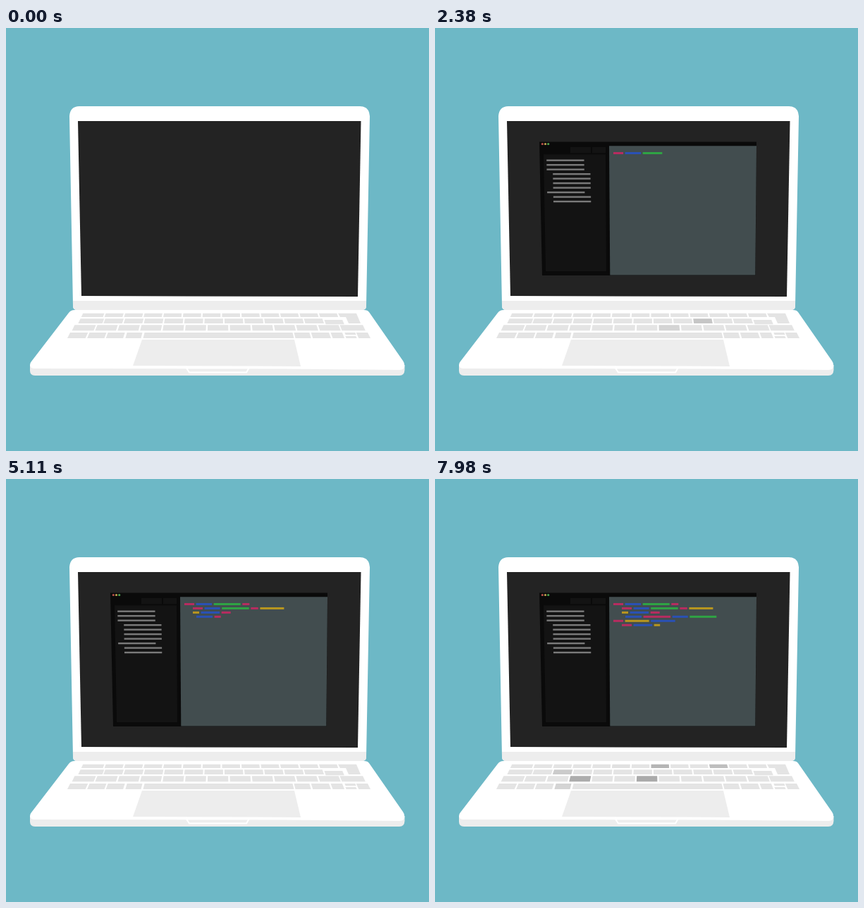
Animation, 600 px wide and 600 px high, one loop 8 s. Source, as an HTML page:

```html
<!DOCTYPE html>
<html lang="en">
<head>
<meta charset="utf-8">
<title>Laptop</title>
<style>
html, body { margin: 0; width: 100%; height: 100%; overflow: hidden; background: #6db8c6; }
svg { display: block; width: 100%; height: 100%; }
</style>
</head>
<body>
<svg id="stage" viewBox="0 0 600 600">
  <rect width="600" height="600" fill="#6db8c6"/>
  <path fill="#fff" d="M90 125Q91 111 104 111H502Q515 111 516 125L511 394Q511 400 505 400H101Q95 400 95 394Z"/>
  <path fill="#ededed" d="M95 387H511V394Q511 400 505 400H101Q95 400 95 394Z"/>
  <path fill="#232323" d="M102 132H503.500L499 381L107 380Z"/>
  <g id="win">
    <path fill="#0a0a0a" d="M148 161.500H456L454.500 351H152Z"/>
    <path fill="#424d4f" d="M247 167.300H456L454.300 350.500H248.300Z"/>
    <path fill="#131313" d="M154 179.300H242L243 345H157ZM192 169H221V177.500H192ZM223 169H242V177.500H223Z"/>
    <g id="side" fill="#7a7a7a"></g>
    <g id="code"></g>
  </g>
  <path fill="#ededed" d="M34 478H565.500V485Q565 493 558 493H41Q34 493 34 486Z"/>
  <path fill="#fff" d="M97 400H508Q513 400 515 403L563 472Q566 476 565 481Q564 485 558 485L387 483.500L41 483Q34 483 34 478Q34 475 36 473L89 404Q92 400 97 400Z"/>
  <path fill="#ededed" d="M193 442H409L418 480L355 479.500L180 479Z"/>
  <path fill="#ededed" stroke="#fff" stroke-width="2" d="M256 482.500L260 488.500H341L344.500 482.500Z"/>
  <g id="keys"></g>
</svg>
<script>
const LOOP = 8000, STEP = 70, BEAT = 1050, TYPING = 1400;
const COLORS = { p: '#b72c60', b: '#2a51b5', g: '#2fa344', y: '#b8961f' };
const $ = id => document.getElementById(id);

function add(parent, tag, attrs) {
  const el = document.createElementNS('http://www.w3.org/2000/svg', tag);
  for (const k in attrs) el.setAttribute(k, attrs[k]);
  parent.appendChild(el);
  return el;
}

// Window details
['#b8504a', '#c3a34e', '#4ba450'].forEach((fill, i) =>
  add($('win'), 'circle', { cx: 152.3 + i * 4.2, cy: 164.5, r: 1.6, fill }));
[...'0001111011'].forEach((indent, i) =>
  add($('side'), 'rect', { x: 158.2 + indent * 8.6 + i * 0.13, y: 186.5 + i * 6.49, width: 53.3, height: 2.4 }));

// Code rows: start, then colour and width of each piece
const ROWS = [
  [253, 'p14 b22.5 g38 p10'],
  [265, 'p14 b22 g38.500 p10.500 y34'],
  [265, 'y9 b26.500 p13'],
  [270, 'b23 p38.500 b22 g38'],
  [253, 'p14 y34 b34.500'],
  [265, 'p14 b26.500 y8.500']
];
const GAP = 2.6;
const pieces = [];
let typed = 0;
ROWS.forEach(([left, text], row) => {
  let x = left;
  text.split(' ').forEach((part, i) => {
    const w = +part.slice(1);
    if (i) { x += GAP; typed += GAP; }
    const el = add($('code'), 'rect', { x, y: 176 + row * 5.95, height: 3, fill: COLORS[part[0]] });
    pieces.push({ el, w, at: typed });
    x += w;
    typed += w;
  });
});

// Typed length over time
const PACE = [[1560, 0], [3430, 158], [4480, 250], [5810, 377], [7000, 483], [7980, typed]];
function typedAt(t) {
  if (t <= PACE[0][0]) return 0;
  for (let i = 1; i < PACE.length; i++) {
    const [t0, a] = PACE[i - 1], [t1, b] = PACE[i];
    if (t <= t1) return a + (b - a) * (t - t0) / (t1 - t0);
  }
  return typed;
}

// Keyboard: side edges fan out from the middle
const keys = [];
function key(l, r, top, bottom) {
  const px = (x, y) => (x + (x - 303) * (y - (top + bottom) / 2) / 430).toFixed(1);
  const points = [[l, top], [r, top], [r, bottom], [l, bottom]].map(([x, y]) => px(x, y) + ',' + y).join(' ');
  const el = add($('keys'), 'polygon', { points, fill: '#e4e4e4' });
  keys.push(el);
  return el;
}
function keyRow(first, end, start, pitch, count, top, bottom, gap) {
  const row = [key(first, end, top, bottom)];
  for (let i = 0; i < count; i++) {
    const x = start + i * pitch;
    row.push(key(x, x + pitch - gap, top, bottom));
  }
  return row;
}
const r1 = keyRow(108, 138.5, 140.6, 27.65, 12, 404.7, 410, 2.2);
const r2 = keyRow(104, 138, 139.5, 28.4, 11, 412.2, 419, 2);
const r3 = keyRow(95.5, 126, 128, 31.6, 11, 421.3, 429.2, 2.3);
const r4 = keyRow(89, 114.5, 116.800, 26.4, 2, 432, 440, 2.2);
r4.push(key(170.5, 192.5, 432, 440));
[[195.5, 407.5], [409.5, 431.5], [434, 459.5], [462, 478.500], [498.5, 515]].forEach(([l, r]) => key(l, r, 432, 440));
key(481, 496, 432, 435.2);
key(482, 497, 437, 440);
const back = key(452.5, 478.500, 414, 420.3);
key(475, 508, 421.3, 429.2);
add($('keys'), 'path', { d: 'M471 404.700H497L503 419H486L482 410H474Z', fill: '#e4e4e4' });

// Key presses: key and the moment of the beat it is darkest
const PRESSES = [
  [r3[7], 185], [r2[9], 210], [r2[0], 455], [r3[1], 455], [back, 470],
  [r4[3], 535], [r2[2], 550], [r1[10], 575], [r1[7], 590],
  [r3[3], 606], [r3[6], 615], [r1[5], 750]
];

function windowScale(t) {
  const p = Math.min(1, Math.max(0, (t - 650) / 720));
  return p < 0.5 ? 4 * p ** 3 : 1 - 4 * (1 - p) ** 3;
}

function draw(time) {
  const t = Math.floor(time % LOOP / STEP) * STEP;
  const s = windowScale(t);
  $('win').setAttribute('visibility', s > 0 ? 'visible' : 'hidden');
  $('win').setAttribute('transform', `translate(278 265) scale(${s}) translate(-278 -265)`);

  const n = typedAt(t);
  for (const { el, w, at } of pieces) el.setAttribute('width', Math.min(w, Math.max(0, n - at)));

  for (const [el, peak] of PRESSES) {
    const d = Math.abs(t % BEAT - peak);
    const k = t < TYPING ? 0 : Math.min(1, Math.max(0, 1.2 * (1 - d / 125)));
    const v = Math.round(228 - 57 * k);
    el.setAttribute('fill', `rgb(${v},${v},${v})`);
  }
}

const begin = performance.now();
function frame() {
  draw(performance.now() - begin);
  requestAnimationFrame(frame);
}
draw(0);
requestAnimationFrame(frame);
</script>
</body>
</html>
```
